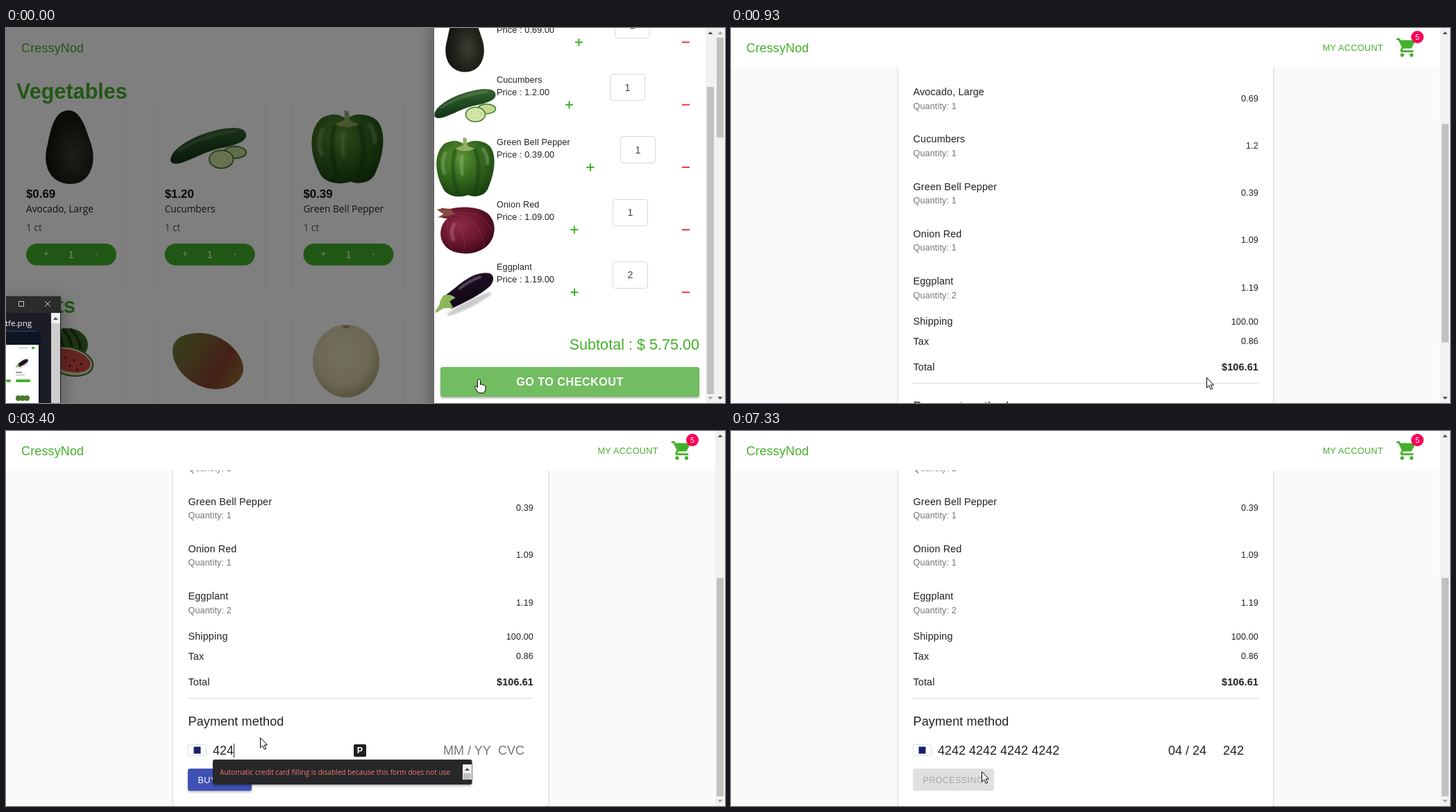
An HTML page for the animation above (8 s loop, 1036x541 px).

```html
<!DOCTYPE html>
<html lang="en">
<head>
<meta charset="utf-8">
<title>Checkout</title>
<style>
html, body { margin: 0; width: 100%; height: 100%; overflow: hidden; background: #fafafa; }
svg { display: block; }
text { font-family: "Liberation Sans", Arial, sans-serif; white-space: pre; }
.ui { font-family: "Open Sans", "Noto Sans", sans-serif; }
.b { font-weight: 700; }
.soft { filter: blur(1.2px); }
.card { filter: drop-shadow(0 1px 1.5px rgba(0,0,0,.28)); }
.raised { filter: drop-shadow(0 2px 1.5px rgba(0,0,0,.3)); }
.sheet { filter: drop-shadow(0 8px 13px rgba(0,0,0,.38)); }
</style>
</head>
<body>
<svg id="stage" width="1036" height="541" viewBox="0 0 1036 541">
<defs>
  <radialGradient id="gAvo" cx=".58" cy=".6" r=".55"><stop stop-color="#3b3b31"/><stop offset=".55" stop-color="#24241d"/><stop offset="1" stop-color="#14150f"/></radialGradient>
  <radialGradient id="gPep" cx=".4" cy=".3" r=".75"><stop stop-color="#5c9334"/><stop offset=".5" stop-color="#34691e"/><stop offset="1" stop-color="#173f0d"/></radialGradient>
  <radialGradient id="gOni" cx=".4" cy=".4" r=".65"><stop stop-color="#8e2a44"/><stop offset=".6" stop-color="#68152c"/><stop offset="1" stop-color="#3b0817"/></radialGradient>
  <linearGradient id="gMan" x1="0" y1=".2" x2="1" y2=".7"><stop stop-color="#6d7a34"/><stop offset=".35" stop-color="#7d6436"/><stop offset=".7" stop-color="#8a4030"/><stop offset="1" stop-color="#93682f"/></linearGradient>
  <radialGradient id="gMel" cx=".45" cy=".4" r=".6"><stop stop-color="#e9e2c2"/><stop offset=".7" stop-color="#d9d0a9"/><stop offset="1" stop-color="#b3a87c"/></radialGradient>
  <linearGradient id="gEgg" x1="0" y1="0" x2=".4" y2="1"><stop stop-color="#33203b"/><stop offset=".4" stop-color="#1a0d1f"/><stop offset="1" stop-color="#100714"/></linearGradient>
  <linearGradient id="gCuc" x1=".4" y1="0" x2=".6" y2="1"><stop stop-color="#44703a"/><stop offset=".4" stop-color="#244f25"/><stop offset="1" stop-color="#112d13"/></linearGradient>
  <g id="avocado">
    <path d="M-3-43C12-44 18-24 23-9C34 18 23 43 1 43C-23 43-33 21-26-3C-22-24-17-42-3-43Z" fill="url(#gAvo)"/>
    <g id="specks" fill="#6d6d60"/>
  </g>
  <g id="cucumber" fill="none">
    <path d="M-44 13C-43 3-20-14 14-21C34-25 44-22 44-14C44-6 30-2 10 2C-8 7-24 17-35 19C-42 20-45 18-44 13Z" fill="url(#gCuc)"/>
    <path d="M-36 5C-20-6 2-15 32-19" stroke="#7b9c6c" stroke-width="2" class="soft" opacity=".6"/>
    <ellipse cx="31" cy="6" rx="13" ry="7" fill="#c6d994" stroke="#3d7a2c" stroke-width="1.500"/>
    <ellipse cx="15" cy="14" rx="14" ry="10.5" fill="#d4e4a8" stroke="#3d7a2c" stroke-width="1.500"/>
    <ellipse cx="15" cy="14" rx="8" ry="5.5" stroke="#a9c672" stroke-width="2" stroke-dasharray="1 4"/>
  </g>
  <g id="pepper" fill="none">
    <path d="M-30-34C-14-42-8-37 0-33C10-42 28-38 35-31C47-18 42 10 34 28C30 42 14 44 4 40C-10 45-28 42-33 28C-42 10-47-18-30-34Z" fill="url(#gPep)"/>
    <path d="M-14-26C-20-5-18 20-9 38M14-26C22-5 20 18 13 38" stroke="#153b0c" stroke-width="5" opacity=".5" class="soft"/>
    <path d="M-29-20C-34-8-33 0-30 8M-4-16C-6-4-5 4-4 10M26-26C32-18 33-12 32-6" stroke="#a3c585" stroke-width="5" stroke-linecap="round" opacity=".4" class="soft"/>
    <path d="M-14-27Q0-20 14-27Q4-30 3-32L2-42L-3-43L-3-32Z" fill="#93ad62"/>
  </g>
  <g id="onion" fill="none">
    <path d="M-39-28L-34-31L-22-30C-8-34 18-34 32-24C46-12 45 10 33 22C20 36-6 38-22 29C-38 19-40-2-26-16L-37-18L-30-22Z" fill="url(#gOni)"/>
    <path d="M-26-20C0-26 26-8 27 27M-26-20C-8-16 2 6-2 34M-26-20C-24-4-26 10-18 30M-26-20C8-34 38-14 40 8" stroke="#d08a9a" stroke-width=".8" opacity=".22"/>
    <path d="M-16-8C-20 0-20 8-17 14" stroke="#d9a0b0" stroke-width="5" stroke-linecap="round" opacity=".35" class="soft"/>
    <path d="M-41-30L-20-29L-15-23L-27-20L-40-17L-31-23Z" fill="#8a4c40"/>
  </g>
  <g id="eggplant" fill="none">
    <ellipse cx="6" cy="17" rx="36" ry="5" transform="rotate(-27 6 17)" fill="#000" opacity=".2" class="soft"/>
    <path d="M-28 4C-10-8 6-28 30-28C43-28 43-17 36-9C22 4 0 14-20 24Z" fill="url(#gEgg)"/>
    <path d="M-8-5C0-12 10-18 22-22" stroke="#c9bdd0" stroke-width="2.500" stroke-linecap="round" opacity=".5" class="soft"/>
    <path d="M-30 4Q-20 2-14 8L-22 13L-17 23Q-28 22-33 24L-42 30L-43 27L-37 18Q-36 9-30 4Z" fill="#8db65a"/>
  </g>
</defs>
</svg>
<script>
const LOOP = 8000, STEP = 1000 / 15, SCROLL_END = 342;
const GREEN = '#43b02a', INDIGO = '#3f51b5', INK = '#212121', GREY = '#757575';
const stage = document.getElementById('stage');
const $ = id => document.getElementById(id);

// y is the middle of the capital letters
const text = (x, y, s, size, fill = INK, attrs = 'letter-spacing=".135"') =>
  `<text x="${x}" y="${Math.round(y + size * .358)}" font-size="${size}" fill="${fill}" ${attrs}>${s}</text>`;
const END = 'text-anchor="end" letter-spacing=".135"', MID = 'text-anchor="middle"';
const UI = 'class="ui"', CAPS = 'letter-spacing=".36"';
const rect = (x, y, w, h, fill, attrs = '') =>
  `<rect x="${x}" y="${y}" width="${w}" height="${h}" fill="${fill}" ${attrs}/>`;
const line = (d, stroke, w = 1) => `<path d="${d}" stroke="${stroke}" stroke-width="${w}" fill="none"/>`;
const arrow = (x, y, dir, fill = '#505050') =>
  `<path d="M${x - 3.5} ${y + 2 * dir}h7l-3.5 ${-4 * dir}z" fill="${fill}"/>`;
const pic = (id, x, y, k = 1) => `<use href="#${id}" transform="translate(${x} ${y}) scale(${k})"/>`;

const items = [
  { name: 'Avocado, Large', price: '0.69', qty: 1, id: 'avocado', plus: 825.5, box: 877.5 },
  { name: 'Cucumbers', price: '1.2', qty: 1, id: 'cucumber', plus: 811.5, box: 870.5 },
  { name: 'Green Bell Pepper', price: '0.39', qty: 1, id: 'pepper', plus: 842, box: 885.5 },
  { name: 'Onion Red', price: '1.09', qty: 1, id: 'onion', plus: 819, box: 874.5 },
  { name: 'Eggplant', price: '1.19', qty: 2, id: 'eggplant', plus: 819, box: 874.5 }
];

function shop() {
  const cards = items.slice(0, 3).map((it, i) => {
    const x = 29 + i * 199.7, cx = x + 63;
    return pic(it.id, cx, 172, 1.235)
      + text(x, 238.5, '$' + Number(it.price).toFixed(2), 16.85, '#111', 'class="b"')
      + text(x, 261.5, it.name, 13.7, INK, UI) + text(x, 288, '1 ct', 13.7, '#555', UI)
      + rect(x, 311, 130, 31.5, GREEN, 'rx="15.7"')
      + text(x + 29, 326, '+', 12, '#fff', MID) + text(x + 65, 327, '1', 14.4, '#fff', MID)
      + text(x + 101, 326, '-', 12, '#fff', MID)
      + text(x, 548, '$1.50', 16.85, '#111', 'class="b"');
  }).join('');
  const rules = [173.5, 213.5, 373.5, 412.5, 573.5].map(x => `M${x} 110V376M${x} 418V541`).join('');
  return rect(0, 0, 1022, 541, '#fff') + line(rules, '#f0f0f0') + cards
    + text(15, 91, 'Vegetables', 30.6, GREEN, 'class="b"') + text(15, 400, 'Fruits', 30.6, GREEN, 'class="b"')
    + '<ellipse cx="88" cy="457" rx="30" ry="24" fill="#3c6b2a"/>'
    + line('M70 437Q86 450 82 478M92 434Q108 448 108 470M82 434Q96 448 96 474', '#1d3d16', 4)
    + '<ellipse cx="92" cy="481" rx="34" ry="20" transform="rotate(14 92 481)" fill="#d9e0b0" stroke="#3c6b2a" stroke-width="2"/>'
    + '<ellipse cx="92" cy="480" rx="30" ry="16" transform="rotate(14 92 480)" fill="#cf4a42"/>'
    + line('M86 474v3M98 478v3M108 483v3M92 486v3M103 491v3', '#3a1512', 2)
    + '<path d="M240 464C241 447 258 439 282 440C314 442 340 468 342 490C343 510 322 522 300 521C268 519 239 492 240 464Z" fill="url(#gMan)"/>'
    + '<ellipse cx="490" cy="480.5" rx="48" ry="52.5" fill="url(#gMel)"/>'
    + '<ellipse cx="490" cy="431" rx="5" ry="2" fill="#a39a68"/>';
}

function checkout() {
  const rows = items.map((it, i) => {
    const y = 307 + i * 68.25;
    return text(262.5, y, it.name, 14.4) + text(262.5, y + 20, 'Quantity: ' + it.qty, 12.6, GREY)
      + text(760, y + 9, it.price, 12.6, INK, END);
  }).join('');
  const sums = [['Shipping', '100.00', 296], ['Tax', '0.86', 324.5]].map(([k, v, y]) =>
    text(262.5, y, k, 14.4) + text(760, y, v, 12.6, INK, END)).join('');
  return rect(0, 0, 1022, 900, '#fafafa') + rect(241, 109, 540, 774, '#fff', 'rx="3.6" class="card"')
    + text(511, 149, 'Checkout', 30.6, INK, MID + ' letter-spacing=".23"')
    + `<circle cx="280.5" cy="200.5" r="11" fill="${INDIGO}"/>` + line('M275 200.5l4 4 7.5-8', '#fff', 2)
    + text(298.5, 200.5, 'Shipping address', 12.6) + line('M405 200.5H625', '#bdbdbd')
    + `<circle cx="643" cy="200.5" r="11" fill="${INDIGO}"/>` + text(643, 200.5, '2', 10.8, '#fff', MID)
    + text(660.5, 200.5, 'Payment details', 12.6) + text(262.5, 262, 'Order summary', 18) + rows
    + `<g transform="translate(0 ${SCROLL_END})">${sums}`
    + text(262.5, 362, 'Total', 14.4) + text(760, 362, '$106.61', 14.4, INK, END + ' class="b"')
    + line('M262 385.5H760', '#dcdcdc') + text(262.5, 418.5, 'Payment method', 18)
    + '<g id="pay"></g></g>';
}

function header() {
  return rect(0, 0, 1022, 57, '#fff') + text(22, 29, 'CressyNod', 18, GREEN)
    + text(852.5, 28, 'MY ACCOUNT', 12.6, GREEN, CAPS)
    + `<path transform="translate(957.6 12) scale(1.35)" fill="${GREEN}" d="M7 18c-1.1 0-2 .9-2 2s.9 2 2 2 2-.9 2-2-.9-2-2-2zM1 2v2h2l3.6 7.6-1.35 2.4C4.5 15.4 5.5 17 7 17h12v-2H7.4l-.2-.4.9-1.6h7.45c.75 0 1.4-.4 1.75-1l3.6-6.5c.3-.7-.1-1.5-.9-1.5H5.2l-.93-2zM17 18c-1.1 0-2 .9-2 2s.9 2 2 2 2-.9 2-2-.9-2-2-2z"/>`
    + '<circle cx="989" cy="13" r="9" fill="#f50057"/>' + text(989, 13, '5', 10.8, '#fff', MID);
}

function drawer() {
  const rows = items.map((it, i) => {
    const y = -16 + i * 90.2, cy = y + 36.5;
    return pic(it.id, 661.5, cy) + text(707, y, it.name, 12.6)
      + text(707, y + 18, `Price : ${it.price}.00`, 12.6)
      + line(`M${it.plus - 5.5} ${cy}h11m-5.5-5.5v11`, GREEN, 2) + line(`M974 ${cy}h11`, '#f0343c', 2)
      + rect(it.box, Math.round(y - 8) + .5, 50, 38, '#fff', 'rx="3.6" stroke="#d8d8d8"')
      + text(it.box + 25, y + 11.5, it.qty, 14.4, '#444', MID);
  }).join('');
  return rect(617, -20, 405, 581, '#fff', 'class="sheet"') + rows
    + text(999, 456.5, 'Subtotal : $ 5.75.00', 21.6, GREEN, 'text-anchor="end"')
    + rect(626, 489, 373, 43, '#72bc61', 'id="go" rx="3.6" class="raised"')
    + text(812.5, 510.5, 'GO TO CHECKOUT', 16.2, '#fff', MID + ' class="b" letter-spacing=".46"')
    + rect(1008, 0, 14, 541, '#f1f1f1') + rect(1010, 85, 10, 443, '#c1c1c1')
    + arrow(1015, 7, 1) + arrow(1015, 534, -1, '#a3a3a3');
}

function smallWindow() {
  return rect(-4, 387, 83, 160, '#1b1c26', 'class="sheet"') + rect(0, 387, 79, 24, '#2b2b2b')
    + line('M18.5 394.5h7v7h-7zM56 394l8 8m0-8l-8 8', '#ccc')
    + text(-1, 426, 'tfe.png', 11.6, '#fff', UI)
    + rect(0, 437, 50, 104, '#0d1422') + line('M0 437.5H44', '#27506e')
    + rect(0, 457, 47, 84, '#fff') + rect(37, 460, 4, 3, GREEN) + rect(18, 461, 14, 1, '#9ccf8d')
    + pic('eggplant', 23, 484, .22) + rect(14, 496, 9, 1.5, '#777') + rect(14, 500, 13, 1, '#aaa')
    + rect(14, 507, 21, 4, GREEN, 'rx="2"') + rect(0, 507, 7, 4, GREEN, 'rx="2"')
    + [18, 24, 30].map(x => `<circle cx="${x}" cy="534" r="4" fill="#49792c"/>`).join('')
    + rect(65, 411, 13, 130, '#f0f0f0') + rect(65, 426, 13, 115, '#cdcdcd') + arrow(71.5, 419, 1);
}

stage.insertAdjacentHTML('beforeend', [
  ['shop', shop()], ['checkout', checkout()], ['header', header()],
  ['shade', rect(0, 0, 1022, 541, '#000')], ['drawer', drawer()], ['bar', ''],
  ['status', rect(-4, 524, 347, 21, '#2a2b2e', 'rx="2"') + text(4, 533, 'Waiting for js.stripe.com...', 9.6, '#d0d3d6', UI)],
  ['window', smallWindow()], ['cursor', '']
].map(([id, body]) => `<g id="${id}">${body}</g>`).join(''));

$('specks').innerHTML = Array.from({ length: 46 }, (_, i) => {
  const a = i * 2.4, r = Math.sqrt(i / 46);
  return `<circle cx="${(4 + 20 * r * Math.cos(a)).toFixed(1)}" cy="${(8 + 28 * r * Math.sin(a)).toFixed(1)}" r=".7" opacity="${(.7 - .5 * r).toFixed(2)}"/>`;
}).join('');

const POINTER = '<path d="M0 0V14.5L3.4 11.4 5.8 16.8 8.2 15.8 5.8 10.5H10Z" fill="#fff" stroke="#000"/>';
const HAND = '<path d="M-2 2Q0-1.5 2 2V8Q4 6 5 8.500Q7 7 8 9.500Q10 9 9.500 14Q9 18 7 20H-1Q-4 15-6 12Q-5.500 9-2 12Z" fill="#fff" stroke="#000" stroke-linejoin="round"/>';
const IBEAM = '<path d="M-3-6.500H-1L0-5.500L1-6.500H3M0-6V6M-3 6.500H-1L0 5.500L1 6.500H3" fill="none" stroke="#222"/>';

const cursorPath = [
  [0, 681, 506], [270, 685, 505], [930, 685, 505], [1270, 673, 466.5], [1330, 673, 466.5],
  [1530, 655, 482], [1590, 655, 482], [1730, 420, 463], [2660, 420, 463], [2940, 366, 442],
  [4600, 366, 442], [4930, 366, 444], [5460, 366, 444], [5930, 335, 479.5], [6330, 335, 479.5],
  [6600, 343, 497], [6930, 343, 497], [7140, 352, 492], [7330, 361, 491], [LOOP, 361, 491]
];
const digitTimes = [2930, 3130, 3330, 3530, 3660, 3800, 3930, 4070, 4200, 4330, 4400, 4530, 4670, 4800, 4930, 5070];
const expiryTimes = [5200, 5330, 5470, 5600];
const cvcTimes = [5730, 5860, 5930];

const clamp = v => Math.min(1, Math.max(0, v));
const ease = p => p * p * (3 - 2 * p);
const typed = (times, now) => times.filter(t => now >= t).length;
const widthOf = s => [...s].reduce((w, c) => w + (/\d/.test(c) ? .556 : .278) * 18, 0);

function cursorAt(now) {
  const i = cursorPath.findIndex(k => k[0] > now);
  const [t0, x0, y0] = cursorPath[i - 1], [t1, x1, y1] = cursorPath[i];
  const p = (now - t0) / (t1 - t0);
  return [x0 + (x1 - x0) * p, y0 + (y1 - y0) * p];
}

function cardIcon(now, brand, inCvc) {
  if (inCvc) return rect(262, 454, 26, 15, '#dfe6ee', 'rx="1.5"') + rect(262, 457, 26, 3, '#b4c8dc')
    + '<circle cx="284" cy="457.500" r="6" fill="#5469b8"/>' + text(284, 457.5, '135', 5.5, '#fff', MID + ' class="b"');
  if (brand) return rect(262.5, 452.5, 26, 16, '#fff', 'rx="1" stroke="#dcdfe6"') + rect(270.5, 455.5, 10, 10, '#1a1f71');
  return rect(263, 454, 24, 15, now < 1600 ? '#e8eeec' : '#cfd7df', 'rx="1.5"')
    + rect(265, 458, 5, 4, '#fff') + line('M266 465.500H284', '#fff', 1);
}

function payForm(now) {
  const n = typed(digitTimes, now), e = typed(expiryTimes, now), c = typed(cvcTimes, now);
  let number = '4242424242424242'.slice(0, n).replace(/(\d{4})/g, '$1 ');
  if (n === 16) number = number.trim();
  const expiry = e < 2 ? '0'.slice(0, e) : '04 / ' + '24'.slice(0, e - 2);
  const cvc = '242'.slice(0, c);
  const inCvc = e === 4, blurred = now >= 6660;
  const field = (x, value, hint, op = 1) => text(x, 461, value || hint, 18, value ? INK : GREY, `opacity="${op}"`);
  const hintOpacity = clamp((now - 1530) / 200);
  let out = cardIcon(now, n > 0, inCvc && !blurred) + field(298, number, 'Card number');
  if (now >= 1600) out += field(630, expiry, 'MM / YY', hintOpacity) + field(709, cvc, 'CVC', hintOpacity);

  if (now >= 1930 && !blurred) {
    const [x, s] = inCvc ? [709, cvc] : n === 16 ? [630, expiry] : [298, number];
    out += rect(Math.round(x + widthOf(s)), 451, 1, 20, INK);
  }
  if (now >= 6860) out += rect(262, 487, 117, 32, '#e0e0e0', 'rx="3.6"') + text(276.5, 503, 'PROCESSING', 12.6, '#a6a6a6', CAPS);
  else {
    const on = n > 0, hover = now >= 6460;
    out += rect(262, 487, 92, 32, !on ? '#e0e0e0' : hover ? '#303f9f' : INDIGO, `rx="3.6" ${on ? 'class="raised"' : ''}`)
      + text(276.5, 503, 'BUY NOW', 12.6, on ? '#fff' : '#a6a6a6', CAPS);
  }
  if (now >= 2000 && now < 3660) out += rect(501, 452, 18, 18, '#1f2123', 'rx="2"') + text(510, 461, 'P', 12.5, '#fff', MID + ' class="b"');
  if (now >= 2130 && now < 3660) out += rect(298, 474, 373.5, 36, '#26282a', 'rx="3" class="raised"')
    + text(308, 492, 'Automatic credit card filling is disabled because this form does not use', 10.15, '#f4766e', UI)
    + rect(658, 481, 13, 22, '#f1f1f1') + rect(659, 494, 11, 9, '#c1c1c1') + arrow(664.5, 488, 1);
  return out;
}

const show = (id, on) => $(id).setAttribute('display', on ? 'inline' : 'none');
const move = (id, x, y) => $(id).setAttribute('transform', `translate(${x} ${y})`);

function render(now) {
  const onCheckout = now >= 267;
  show('shop', !onCheckout);
  show('checkout', onCheckout);
  show('window', now < 130);
  show('status', onCheckout && now < 800);
  show('drawer', now < 530);
  $('shade').setAttribute('opacity', .5 * (1 - ease(clamp((now - 267) / 245))));
  move('drawer', Math.round(405 * ease(clamp((now - 333) / 196))), 0);
  $('go').setAttribute('fill', onCheckout ? '#dedede' : '#72bc61');

  const p = clamp((now - 720) / 613);
  const scroll = Math.round(SCROLL_END * (1 - (1 - p) ** 2.27));
  move('checkout', 0, -scroll);
  const top = 14 + 198 * scroll / SCROLL_END;
  $('bar').innerHTML = rect(1022, 0, 14, 541, '#f1f1f1') + rect(1024, top, 10, onCheckout ? 315 : 144, '#c1c1c1')
    + arrow(1029, 7, 1, scroll ? '#505050' : '#a3a3a3') + arrow(1029, 534, -1, scroll < SCROLL_END ? '#505050' : '#a3a3a3');
  $('pay').innerHTML = payForm(now);

  const [x, y] = cursorAt(now);
  const overButton = !onCheckout || (now >= 6460 && now < 6860);
  const overField = now >= 1200 && now < 2800;
  $('cursor').innerHTML = overButton ? HAND : overField ? IBEAM : POINTER;
  move('cursor', Math.round(x) + .5, Math.round(y) + .5);
}

// the picture advances 15 times a second
let last = -1;
const start = performance.now();
function tick() {
  const step = Math.floor(((performance.now() - start) % LOOP + 4) / STEP) % (LOOP / STEP);
  if (step !== last) render((last = step) * STEP + 4);
  requestAnimationFrame(tick);
}
tick();
</script>
</body>
</html>
```
